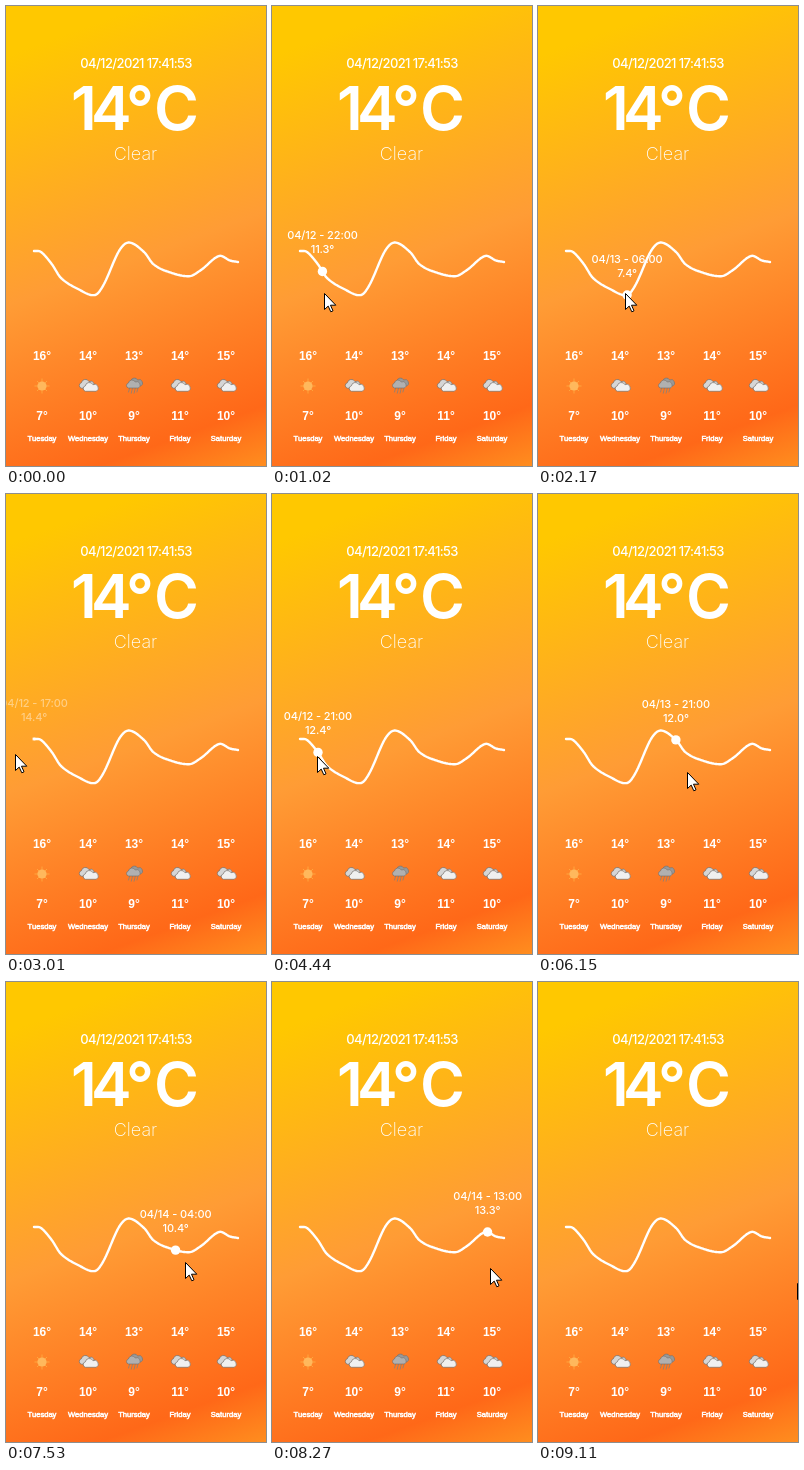
An HTML page for the animation above (9160 ms loop, 260 by 460 pixels).

```html
<!DOCTYPE html>
<html lang="en">
<head>
<meta charset="utf-8">
<title>Weather</title>
<style>
  html, body { margin: 0; width: 100%; height: 100%; overflow: hidden; }
  body { background: linear-gradient(160deg, #ffc800 9%, #ff9c35 54%, #ff6818 89%, #ff9420 102%); }
  svg { display: block; width: 260px; height: 460px; }
  text { fill: #fff; font-family: Inter, sans-serif; }
  .mid { text-anchor: middle; }
  .date { font-size: 13px; font-weight: 500; letter-spacing: -.6px; }
  .now { font-size: 61px; font-weight: 600; }
  .sky { font-size: 18px; font-weight: 200; }
  .tip { font-size: 11px; font-weight: 500; letter-spacing: -.1px; }
  .deg { font: bold 12px "Liberation Sans", sans-serif; }
  .day { font: 7.6px "Liberation Sans", sans-serif; stroke: #fff; stroke-width: .55px; }
</style>
</head>
<body>
<svg viewBox="0 0 260 460">
  <defs>
    <g id="sun">
      <path d="M0-7.500V7.500M-7.500 0H7.500M-5-5L5 5M-5 5L5-5" stroke="#ffae42" stroke-width=".8"/>
      <circle r="4.600" fill="#ffb85c"/>
    </g>
    <path id="puff" d="M-6 4a3.200 3.200 0 0 1 0-6.200a4.600 4.600 0 0 1 8.600-1.300a3.800 3.800 0 0 1 3.800 7.500z"/>
    <g id="clouds" transform="scale(.88)" stroke="#77706a" stroke-width=".8">
      <use href="#puff" x="-1.500" y="-1.500" fill="#d5d5d5"/>
      <use href="#puff" x="3" y="2" fill="#f0f0f0"/>
    </g>
    <g id="rain" transform="scale(.8)">
      <path d="M-5 1L-7 8M-1.500 1L-3.500 9.500M2 1L0 9.500M5.500 1L3.500 8" stroke="#85807c"/>
      <g stroke="#77716c" stroke-width=".8">
        <use href="#puff" x="2" y="-4" fill="#999"/>
        <use href="#puff" x="-1" y="-1.500" fill="#b0b0b0"/>
      </g>
    </g>
  </defs>

  <text class="date mid" x="130" y="62">04/12/2021 17:41:53</text>
  <text class="now" x="65 85 120 148" y="124">14°C</text>
  <text class="sky mid" x="129.500" y="154">Clear</text>
  <g id="week"></g>

  <path id="curve" fill="none" stroke="#fff" stroke-width="2.400" stroke-linecap="round" stroke-linejoin="round"/>
  <g id="marker">
    <circle id="dot" fill="#fff"/>
    <text id="hour" class="tip mid" y="-32"></text>
    <text id="temp" class="tip mid" y="-18"></text>
  </g>
  <path id="cursor" d="M.5.5V16.500L4.200 13.100 6.800 18.800 9 17.800 6.500 12.200H11.800Z" fill="#fff" stroke="#000"/>
</svg>
<script>
const LOOP = 9160, LEFT = 28, WIDTH = 204, HOURS = 48;
const $ = id => document.getElementById(id);
const clamp01 = v => Math.min(1, Math.max(0, v));

const knots = [
  [28, 245], [35, 246], [46, 258.4], [55, 272], [72, 283], [89, 289], [98, 278],
  [113, 245], [123, 236.5], [138, 246], [147, 257.8], [160, 265], [183, 270.2],
  [195, 264], [213, 250], [224, 254.5], [232, 256]
];

// time, x, y of the pointer tip
const stops = [
  [0, -20, 270], [1020, 52, 287], [1430, 100, 299], [1900, 100, 299], [2150, 89, 288],
  [2810, 34, 266], [3010, 10, 260], [3250, -14, 260], [3570, -14, 262], [4440, 45.8, 262],
  [5360, 100, 274], [6150, 149, 278], [7000, 150, 278], [7530, 179, 280],
  [8370, 224, 287], [9110, 259, 301], [LOOP, 261, 302]
];

const segment = (keys, v) => Math.max(1, keys.findIndex(k => k[0] >= v));

function pointerAt(t) {
  const i = segment(stops, t);
  const [t0, x0, y0] = stops[i - 1], [t1, x1, y1] = stops[i];
  const u = (t - t0) / (t1 - t0);
  return [x0 + (x1 - x0) * u, y0 + (y1 - y0) * u];
}

function slope(i) {
  const a = knots[Math.max(0, i - 1)], b = knots[Math.min(knots.length - 1, i + 1)];
  return (b[1] - a[1]) / (b[0] - a[0]);
}

// cubic Hermite through the knots
function curveY(x) {
  const i = segment(knots, x);
  const [x0, y0] = knots[i - 1], [x1, y1] = knots[i];
  const w = x1 - x0, u = (x - x0) / w, s = u * u * (3 - 2 * u);
  return y0 + (y1 - y0) * s
    + w * u * (1 - u) * ((1 - u) * slope(i - 1) - u * slope(i));
}

const curve = $("curve");
const points = Array.from({ length: WIDTH + 1 }, (_, i) =>
  `${LEFT + i} ${curveY(LEFT + i).toFixed(2)}`);
curve.setAttribute("d", "M" + points.join("L"));
const curveLength = curve.getTotalLength();

const week = [
  ["Tuesday", 16, 7, "sun"], ["Wednesday", 14, 10, "clouds"], ["Thursday", 13, 9, "rain"],
  ["Friday", 14, 11, "clouds"], ["Saturday", 15, 10, "clouds"]
];
$("week").innerHTML = week.map(([day, high, low, icon], i) => `
  <g class="mid" transform="translate(${36 + 46 * i} 0)">
    <text class="deg" y="354">${high}°</text>
    <use href="#${icon}" y="380"/>
    <text class="deg" y="414">${low}°</text>
    <text class="day" y="435">${day}</text>
  </g>`).join("");

const two = n => String(n).padStart(2, "0");

function draw(t) {
  const [x, y] = pointerAt(t);
  $("cursor").setAttribute("transform", `translate(${Math.floor(x)} ${Math.round(y)})`);

  // the dot travels by curve length, the reading by pointer position
  const part = clamp01((x - LEFT) / WIDTH);
  const p = curve.getPointAtLength(part * curveLength);
  const index = Math.min(HOURS - 1, Math.floor(part * HOURS));
  const hour = 17 + index;
  const dataY = curveY(LEFT + index / (HOURS - 1) * WIDTH);

  // the marker fades where the pointer leaves the chart
  const fade = clamp01((x - 3) / 16) * clamp01((297 - y) / 4);
  $("marker").setAttribute("transform", `translate(${p.x} ${p.y})`);
  $("marker").setAttribute("opacity", fade);
  $("dot").setAttribute("r", 4.7 * fade);
  $("hour").textContent = `04/${12 + Math.floor(hour / 24)} - ${two(hour % 24)}:00`;
  $("temp").textContent = (14.4 - (dataY - 245) * .16).toFixed(1) + "°";
}

const start = performance.now();
function tick() {
  draw((performance.now() - start) % LOOP);
  requestAnimationFrame(tick);
}
tick();
</script>
</body>
</html>
```
